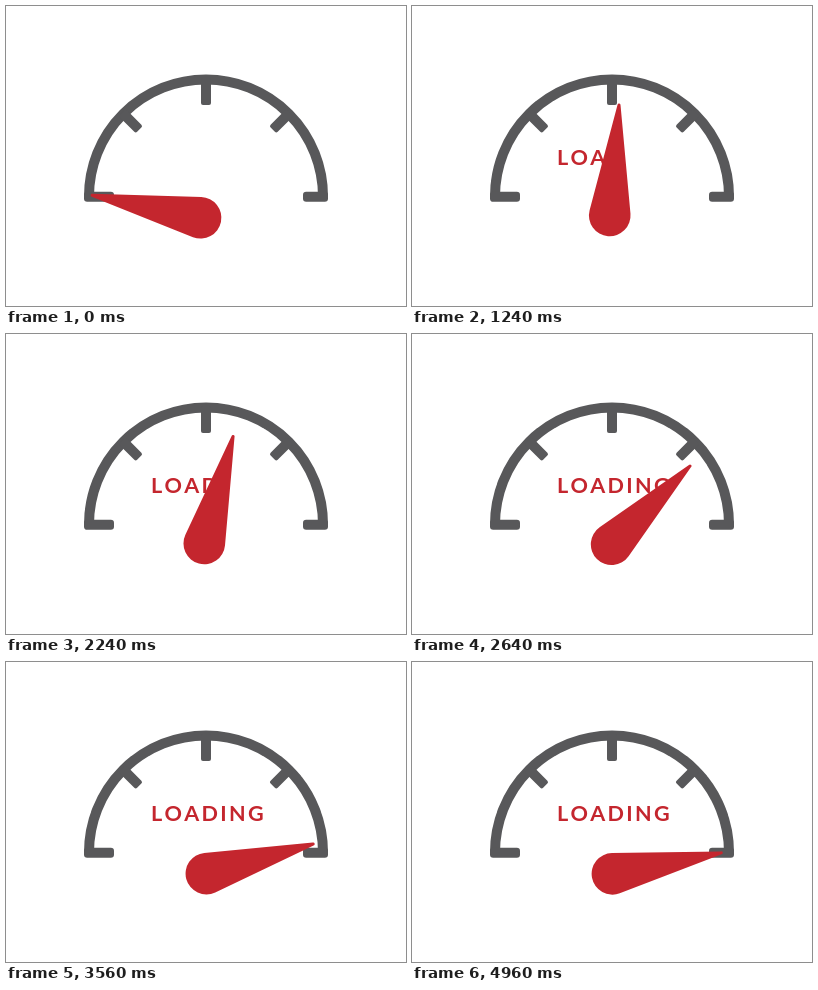
These frames come from a looping animation (400 px wide and 300 px high, 5000 ms). An HTML page:

```html
<!DOCTYPE html>
<html lang="en">
<head>
<meta charset="utf-8">
<title>Loading gauge</title>
<style>
  html, body { margin: 0; width: 100%; height: 100%; overflow: hidden; background: #fff; }
  svg { display: block; width: 100%; height: 100%; }
  text { font: 700 21.6px Lato, "Open Sans", sans-serif; font-kerning: none; letter-spacing: 2.3px; }
</style>
</head>
<body>
<svg viewBox="0 0 400 300">
  <defs>
    <clipPath id="swept">
      <rect class="turn" x="-300" y="-300" width="600" height="300"/>
    </clipPath>
  </defs>
  <g fill="#58585a">
    <path d="M83 191V190.4A117 117 0 0 1 317 190.4V191" fill="none" stroke="#58585a" stroke-width="10"/>
    <rect x="78" y="185.8" width="30" height="10" rx="3.2"/>
    <rect x="297" y="185.8" width="25" height="10" rx="3.2"/>
    <rect x="195" y="72" width="10" height="27" rx="2"/>
    <rect x="195" y="72" width="10" height="24" rx="2" transform="rotate(-45 200 190.4)"/>
    <rect x="195" y="72" width="10" height="24" rx="2" transform="rotate(45 200 190.4)"/>
  </g>
  <g fill="#c4262e">
    <g clip-path="url(#swept)"><text x="145" y="159.4">LOADING</text></g>
    <path class="turn" d="M6.5-20.5L113.8-1.5A1.5 1.5 0 0 1 113.8 1.5L6.5 20.5A20.8 20.8 0 1 1 6.5-20.5Z"/>
  </g>
</svg>
<script>
  const LOOP = 5000, STEP = 40;
  const START = 11.7, MIDDLE = 101.6, END = 169.1;
  const turning = document.querySelectorAll('.turn');

  const clamp = u => Math.min(1, Math.max(0, u));
  const inOut = u => u < 0.5 ? 4 * u ** 3 : 1 - 4 * (1 - u) ** 3;

  // Quick start with a long settle: cubic Bezier (x1, 0, x2, 1)
  function settle(u, x1 = 0.13, x2 = 0.17) {
    let lo = 0, hi = 1;
    for (let i = 0; i < 24; i++) {
      const s = (lo + hi) / 2, r = 1 - s;
      const x = 3 * s * r * r * x1 + 3 * s * s * r * x2 + s ** 3;
      if (x < u) lo = s; else hi = s;
    }
    return lo * lo * (3 - 2 * lo);
  }

  // Degrees clockwise from pointing left
  function angle(t) {
    return START
      + (MIDDLE - START) * inOut(clamp(t / 1690))
      + (END - MIDDLE) * settle(clamp((t - 2130) / 2170));
  }

  function draw(t) {
    const a = angle(Math.floor(t / STEP) * STEP) - 180;
    for (const el of turning)
      el.setAttribute('transform', `translate(197.5 212.4) rotate(${a.toFixed(2)})`);
  }

  const begin = performance.now();
  function tick() {
    draw((performance.now() - begin) % LOOP);
    requestAnimationFrame(tick);
  }
  tick();
</script>
</body>
</html>
```
